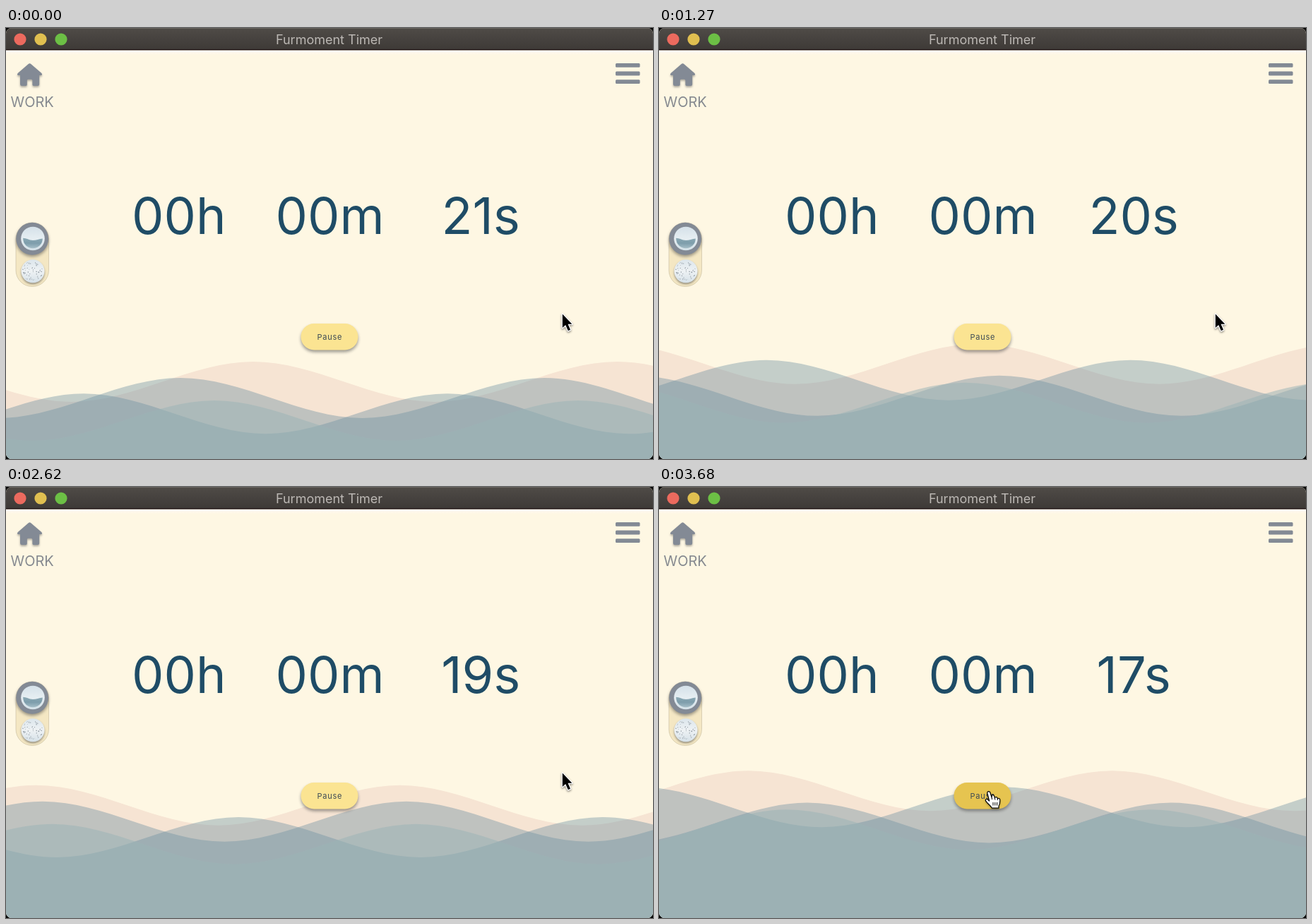
Write an HTML page with a canvas that moves like this. It is 916 by 611 pixels and loops after 3.78 s.

```html
<!DOCTYPE html>
<html lang="en">
<head>
<meta charset="utf-8">
<title>Furmoment Timer</title>
<style>
  html, body { margin: 0; width: 100%; height: 100%; overflow: hidden; background: #000; }
  canvas { display: block; }
</style>
</head>
<body>
<canvas id="stage" width="916" height="611"></canvas>
<script>
const W = 916, H = 611, LOOP = 3780;
const ctx = document.getElementById('stage').getContext('2d');
const GREY = '#838a95', CREAM = '#fef7e3', NAVY = '#1f4c66';
const PERIOD = 515, SWELL = 57;

// Steps last 100 ms, apart from a few that last 90 ms.
const SHORT_STEPS = new Set([4, 6, 12, 14, 16, 20, 24, 26, 28, 33, 35, 36]);
const starts = [0];
for (let i = 0; i < 38; i++) starts.push(starts[i] + (SHORT_STEPS.has(i) ? 90 : 100));

// crest position at time zero, drift in px per ms
const waves = [
  { x: 350, y: 473,   drift: 0.0793,  fill: 'rgb(246,228,211)' },
  { x: 247, y: 496,   drift: -0.0745, fill: 'rgba(107,144,160,.4)' },
  { x: 110, y: 518.2, drift: -0.1128, fill: 'rgba(107,144,160,.4)' },
  { x: 295, y: 528,   drift: 0.109,   fill: 'rgba(156,180,182,.52)' }
];

function withShadow(dx, dy, blur, color, draw) {
  ctx.save();
  ctx.shadowOffsetX = dx;
  ctx.shadowOffsetY = dy;
  ctx.shadowBlur = blur;
  ctx.shadowColor = color;
  draw();
  ctx.restore();
}

function roundRect(x, y, w, h, r, fill) {
  ctx.beginPath();
  ctx.roundRect(x, y, w, h, r);
  ctx.fillStyle = fill;
  ctx.fill();
}

function disc(x, y, r, fill) {
  ctx.beginPath();
  ctx.arc(x, y, r, 0, Math.PI * 2);
  ctx.fillStyle = fill;
  ctx.fill();
}

function verticalGradient(y0, y1, ...colors) {
  const g = ctx.createLinearGradient(0, y0, 0, y1);
  colors.forEach((c, i) => g.addColorStop(i / (colors.length - 1), c));
  return g;
}

function seededRandom(seed) {
  return () => (seed = seed * 16807 % 2147483647) / 2147483647;
}

function label(text, x, y, size, color, align = 'center', spacing = 0) {
  ctx.font = `400 ${size}px Inter, sans-serif`;
  ctx.letterSpacing = spacing + 'px';
  ctx.textAlign = align;
  ctx.fillStyle = color;
  ctx.fillText(text, x, y);
}

function drawTitleBar() {
  ctx.fillStyle = verticalGradient(0, 30, '#4f4b47', '#3e3a37');
  ctx.fillRect(0, 0, W, 30);
  ctx.fillStyle = '#69655f';
  ctx.fillRect(0, 0, W, 1);
  ctx.fillStyle = '#1f1416';
  ctx.fillRect(0, 30, W, 1.5);
  ctx.fillStyle = verticalGradient(32, 38, '#fffaf6', CREAM);
  ctx.fillRect(0, 32, W, 6);
  ['#ec6a5e', '#e0bf50', '#6cbf45'].forEach((c, i) => disc(20 + i * 29, 16, 8.6, c));
  label('Furmoment Timer', 457.5, 22.5, 18, '#bcb8b4');
}

function drawHome() {
  withShadow(0, 2, 3, 'rgba(70,70,70,.45)', () => {
    const house = new Path2D('M31.8 50.9Q33.5 49.4 35.2 50.9L50.3 64Q52.2 66.6 49.6 67H47.2V79.5Q47.2 82 44.7 82H39Q37.4 82 37.4 80.3V74.5Q37.4 72.8 35.7 72.8H31.5Q29.8 72.8 29.8 74.5V80.3Q29.8 82 28.2 82H22.4Q20 82 20 79.5V67H17.5Q14.9 66.6 16.8 64Z');
    ctx.fillStyle = GREY;
    ctx.fill(house);
  });
  label('WORK', 6.5, 112, 20, '#868a90', 'left');
}

function drawMenu() {
  for (let i = 0; i < 3; i++) roundRect(863, 50 + i * 11.6, 34.5, 5.8, 1.5, GREY);
}

function drawToggle() {
  roundRect(14, 276, 46.5, 90.5, 23, '#f4e7c3');
  ctx.strokeStyle = 'rgba(170,160,130,.4)';
  ctx.lineWidth = 1;
  ctx.stroke();
  withShadow(0, 2.5, 4, 'rgba(60,60,60,.5)', () => disc(37.2, 298.7, 23, GREY));

  disc(38, 298.5, 16.8, verticalGradient(282, 315, '#d5e1e9', '#e6eef2', '#d3e0e7'));
  ctx.save();
  ctx.beginPath();
  ctx.arc(38, 298.5, 13.8, 0, Math.PI * 2);
  ctx.clip();
  ctx.fillStyle = verticalGradient(297, 313, '#8eabb6', '#7d9dab', '#a9c1ca');
  ctx.fill(new Path2D('M22 298C28 297 32 301 38 301S48 298 55 298.5V316H22Z'));
  ctx.restore();

  withShadow(0, 2, 3, 'rgba(60,60,60,.5)', () =>
    disc(38, 344.8, 16.5, verticalGradient(328, 361, '#dce6ec', '#eef2f4', '#d6e1e8')));
  const random = seededRandom(77);
  for (let i = 0; i < 60; i++) {
    const r = 14.5 * Math.sqrt(random()), a = random() * Math.PI * 2;
    disc(38 + r * Math.cos(a), 344.8 + r * Math.sin(a), 0.4 + random() * 0.35, '#8b959d');
  }
}

function drawWave(wave, t, lift) {
  const half = PERIOD / 2, lead = half * 30 / 88;
  const crest = wave.y - lift, trough = crest + SWELL;
  let x = (wave.x + wave.drift * t) % PERIOD - 2 * PERIOD;
  ctx.beginPath();
  ctx.moveTo(x, crest);
  for (let down = true; x < W; x += half, down = !down) {
    const from = down ? crest : trough, to = down ? trough : crest;
    ctx.bezierCurveTo(x + lead, from, x + half - lead, to, x + half, to);
  }
  ctx.lineTo(x, H);
  ctx.lineTo(-2 * PERIOD, H);
  ctx.closePath();
  ctx.fillStyle = wave.fill;
  ctx.fill();
}

// The water rises a little faster early in each counted second.
function waterLift(t) {
  const phase = (t + 310) % 1000 / 1000;
  return 0.0197 * t + 2.2 * (Math.sin(Math.PI * phase) - 0.827);
}

function drawButton(hovered) {
  withShadow(0, 3, 4, 'rgba(60,60,60,.5)', () =>
    roundRect(417.5, 419, 81, 37.5, 18.7, hovered ? '#e6c450' : '#fbe492'));
  label('Pause', 458.3, 441.7, 11, '#3d4a55', 'center', 0.7);
}

function drawArrow(x, y) {
  ctx.save();
  ctx.translate(x, y);
  const arrow = new Path2D('M.8 1.6V21L5.2 17L8.8 25.2L12 23.8L8.5 15.8H14.4Z');
  ctx.lineJoin = 'round';
  ctx.strokeStyle = '#fff';
  ctx.lineWidth = 2.6;
  withShadow(0, 1.5, 3, 'rgba(0,0,0,.45)', () => ctx.stroke(arrow));
  ctx.fillStyle = '#000';
  ctx.fill(arrow);
  ctx.restore();
}

function drawHand(x, y) {
  ctx.save();
  ctx.translate(x, y);
  const hand = new Path2D('M-2.2 2C-2.6-.8 1.2-1.2 2 1.5L4 8C5-.2 8 7 8.4 8.6C10 6.6 12 7.6 12.3 9.8C14.5 8.6 16 10 15.8 12.5C15.8 16 15.4 18 14 20V23.2H4.2C3.4 20.5-.4 18-3.6 14.2C-6.2 11.2-3.6 9.4-1.4 11.2L.6 13Z');
  ctx.lineJoin = 'round';
  ctx.fillStyle = '#fff';
  withShadow(0, 1.5, 3, 'rgba(0,0,0,.4)', () => ctx.fill(hand));
  ctx.strokeStyle = '#000';
  ctx.lineWidth = 1.2;
  ctx.stroke(hand);
  ctx.lineWidth = 1;
  ctx.stroke(new Path2D('M4 8L4.5 11M8.4 8.6L8.8 11.5M12.3 9.8V12M6 15V19.5M8.8 15V19.5M11.6 15V19.5'));
  ctx.restore();
}

function draw(t, step) {
  ctx.clearRect(0, 0, W, H);
  ctx.save();
  ctx.beginPath();
  ctx.roundRect(0, 0, W, H, 8);
  ctx.clip();
  ctx.fillStyle = CREAM;
  ctx.fillRect(0, 0, W, H);
  drawTitleBar();
  drawHome();
  drawMenu();

  const lift = waterLift(t);
  waves.forEach(wave => drawWave(wave, t, lift));
  drawToggle();

  const seconds = 21 - Math.floor((step + 2) / 10);
  ['00h', '00m', seconds + 's'].forEach((text, i) => label(text, 244.8 + i * 213.7, 291.5, 72, NAVY));

  const p = Math.min(1, Math.max(0, (t - 3135) / 445));
  const glide = p * p * (3 - 2 * p);
  const x = 787 - 320 * glide, y = 404 + 28 * glide;
  const hovered = x < 498;
  drawButton(hovered);
  (hovered ? drawHand : drawArrow)(x, y);
  ctx.restore();
}

function tick() {
  const now = performance.now() % LOOP;
  const step = starts.findLastIndex(s => s <= now);
  draw(starts[step], step);
  requestAnimationFrame(tick);
}
tick();
</script>
</body>
</html>
```
